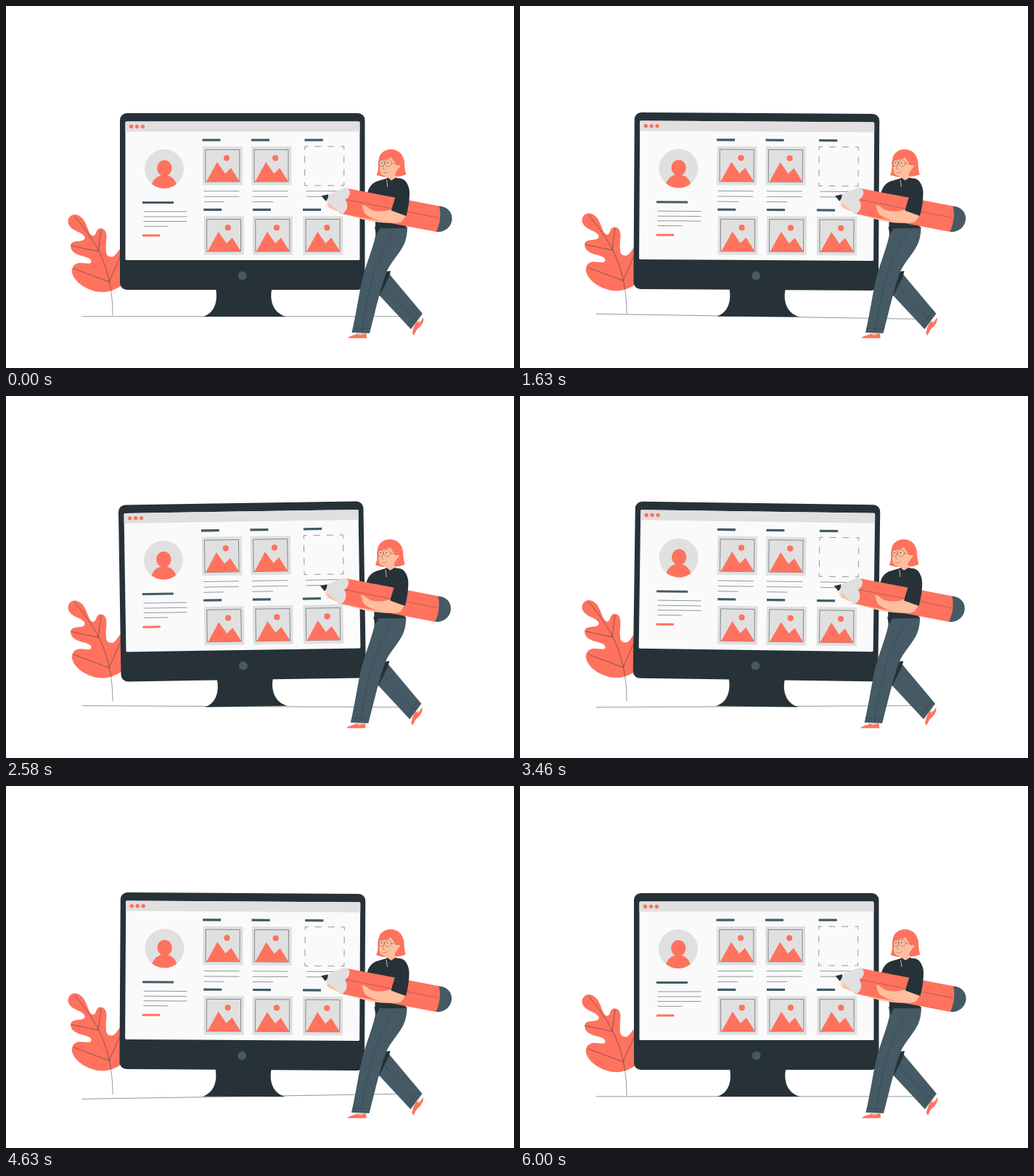
Animation of 700x500 px, one loop 6040 ms. Source, as an HTML page:

```html
<!DOCTYPE html>
<html lang="en">
<head>
<meta charset="utf-8">
<title>Designer at work</title>
<style>
  html, body { margin: 0; width: 100%; height: 100%; overflow: hidden; background: #fff; }
  svg { display: block; width: 700px; height: 500px; }
  .red { fill: #ff725e; }
  .dark { fill: #263238; }
  .slate { fill: #455a64; }
  .grey { fill: #e0e0e0; }
  .skin { fill: #ffbe9d; }
  .line { fill: none; stroke: #263238; stroke-width: .5; stroke-linecap: round; stroke-linejoin: round; }
  .soft { stroke-opacity: .65; }
</style>
</head>
<body>
<svg viewBox="0 0 700 500">
  <defs>
    <clipPath id="round"><circle cx="218" cy="225" r="27"/></clipPath>
    <g id="card">
      <rect class="grey" width="55" height="53.5"/>
      <rect class="line" x="4.2" y="4.4" width="46.6" height="44.4"/>
      <path class="red" d="M5 48.8 20 21.5 31 37.5 39 29.7 51 48.8Z"/>
      <circle class="red" cx="33" cy="16" r="4.1"/>
    </g>
  </defs>

  <path id="floor" class="line" d="M105 428.8H545"/>

  <g id="plant">
    <path class="red" d="M95 288C88 288 84 295 86 301C90 311 103 311 108 318C110 322 107 324 102 324.5C96 325 90 325 89 331C89 339 96 343 104 345C112 347 118 349 117.5 353.5C116 358 108 354 100 355C93 356 89 363 91.5 370C95 382 113 394 130 395C142 396 153 391 162 384L166 328C157 332 154 342 148 346C142 348 138 344 138 339C137 331 138.5 324 138.5 317C138 309 133 306 128 307.5C123 310 125 317 120 317.5C114 317 113 304 106 294C102 290 99 288 95 288Z"/>
    <path class="line" d="M95 291C115 315 128 335 136 358C143 378 147 400 147 427M90 331 127 339 131 309M94 363 142 381 158 345"/>
  </g>

  <g id="monitor">
    <path class="dark" d="M289 390C292 406 289 423 272 429H386C367 424 363 405 366.5 390Z"/>
    <rect class="dark" x="157" y="148" width="337.5" height="244" rx="9.5"/>
    <rect x="164.5" y="159.5" width="323" height="191.5" rx="1.5" fill="#fafafa"/>
    <path class="grey" d="M164.5 173.5V161Q164.5 159.5 166 159.5H486Q487.5 159.5 487.5 161V173.5Z"/>
    <circle class="slate" cx="325.7" cy="372.5" r="6"/>
    <g class="red">
      <circle cx="172.6" cy="166.5" r="2.7"/>
      <circle cx="180.5" cy="166.5" r="2.7"/>
      <circle cx="188.4" cy="166.5" r="2.7"/>
    </g>
    <circle class="grey" cx="218" cy="225" r="27"/>
    <g class="red" clip-path="url(#round)">
      <ellipse cx="218.3" cy="224" rx="10.2" ry="11"/>
      <path d="M200 249C203 238 210 233.5 218 233.5S233 238 236 249V256H200Z"/>
    </g>
    <rect class="red" x="188" y="315.5" width="24.3" height="3"/>
    <path class="slate" d="M188 270h43v3h-43zM270.5 183.5h25v3.3h-25zM338 183.5h25v3.3h-25zM411.5 183.5h25.3v3.3h-25.3zM272.3 279.8h25v3.2h-25zM340 279.8h25v3.2h-25zM409 279.8h25v3.2h-25z"/>
    <path class="line" d="M190 284H249M190 291H249M190 297.5H249M190 304.3H223M273 255.7H321M273 263.2H321M273 270.4H300M340 255.7H388M340 263.2H388M340 270.4H368M414 255.7H462M414 263.2H462"/>
    <use href="#card" x="271" y="194"/>
    <use href="#card" x="338.2" y="194"/>
    <use href="#card" x="272.8" y="290.2"/>
    <use href="#card" x="340" y="290.2"/>
    <use href="#card" x="409.3" y="290.2"/>
    <rect class="line" style="stroke-linecap:butt" x="411.7" y="194" width="54" height="54" stroke-dasharray="9 9" stroke-dashoffset="4.5"/>
  </g>

  <g id="woman">
    <path class="slate" d="M528 370 574 425 558 446.5 513 398 512 372Z"/>
    <path class="dark" d="M511 368 530 366 528 374 515 400 511 402Z"/>
    <path class="line soft" d="M521 385 566 436M554 442 570 420"/>
    <path class="skin" d="M564 440 569 434 573 437 567 443Z"/>
    <path class="red" d="M575 430C577 436 571 443 566 447L562 455 560 452C561 444 563 441 566 436L570 438Z"/>
    <path class="slate" d="M510 305H553C553 315 551 325 547 332C541 343 530 355 525 366C518 382 508 425 501 452L476.5 451C482 428 486 400 490 382C494 362 505 337 509 318Z"/>
    <path class="dark" d="M508 305 516 306 510 316Z"/>
    <path class="line soft" d="M534 310C525 330 512 350 506 372C500 396 493 428 490 450M478 445 502 446"/>
    <path class="skin" d="M482 452H497V456H484Z"/>
    <path class="red" d="M471 458.7C472 456 479 455 484 453L488 455 496 452.5 497.3 458.7Z"/>

    <path class="dark" d="M525 238 513 241.5C504 244 500 251 498 258L509 268V307H551L555 262C556 248 552 238 541 238Z"/>

    <path class="red" d="M513.5 214C514 203 522 198 530 198C542 198 548 206 549 216C549 223 550 228 551.3 232.5C546 235 541 236 535 235L520 236 510.5 233.5C513.5 228 513 220 513.5 214Z"/>
    <path class="skin" d="M515.5 213C520 213 527 212 531 209C533 213 536 216 539 220C544 216 545 222 541 224C539 228 537 229 536.5 232V239L531 241 525.5 239V235.5C518 235 514.5 231 515 225Z"/>
    <g class="line soft">
      <circle cx="517.5" cy="217" r="4.3"/>
      <circle cx="526.8" cy="217" r="4.7"/>
      <path d="M531.5 217 543 219.5M520.5 220 519.5 225 522 225.2M519.5 230.5Q523 231.5 526 229"/>
    </g>
    <circle class="dark" cx="518" cy="216.5" r=".8"/>
    <circle class="dark" cx="526" cy="216.5" r=".8"/>
    <path d="M550 224 556 228" fill="none" stroke="#ff725e" stroke-opacity=".4" stroke-width=".5"/>
    <path class="dark" d="M524 239 526 237 531 241 538 236.5 541 240 531 246 526 251Z"/>
    <path d="M524.5 240 526 250" fill="none" stroke="#ffd9c7" stroke-width=".8"/>

    <path class="skin" d="M440 271 451 273 500 287H546V298.5C526 302 502 298 485 293C470 289 457 284 450 280.5L443 278 446 277 440.5 275 445 274Z"/>
    <path class="red" d="M468 251.5 598 276.6C601 288 599 302 593.5 312L460 286.5Z"/>
    <path class="slate" d="M597 276.5C609 277 616 286 614.5 296C613 306 604 313 593 311.8C598 301 600 288 597 276.5Z"/>
    <path class="grey" d="M443 260.5 465 251.7C471 250 475 255 473.5 259.5C473 264 470 266 467.5 267.5C472 274 471 283 463 287.5L440.5 269Z"/>
    <path class="dark" d="M434.7 262.3 444 260.2C444.5 264 443 267 440.5 269.5Z"/>
    <path class="line soft" d="M469 267.5 596 292.5"/>
    <path class="skin" d="M533 280C522 285 509 284.5 502 281C498 278 494 274 490.5 275.5C493 279 492 284 496 288C505 296 533 303 545 298L552 288Z"/>
    <path class="dark" d="M544 240C552 242 556 249 556 258C556 270 554 281 551.5 290L531 282.5C533 274 536 266 538 260Z"/>
  </g>
</svg>
<script>
  const LOOP = 6040, FPS = 24;
  const part = id => document.getElementById(id);
  const floor = part('floor'), plant = part('plant'), monitor = part('monitor'), woman = part('woman');
  const phase = (t, period) => (t % period) / period;

  // 0 → 1 at a quarter → -1 at three quarters → 0
  const sway = p => p < .25 ? 4 * p : p < .75 ? 2 - 4 * p : 4 * p - 4;
  // 0 → 1 at half → 0
  const bob = p => 1 - Math.abs(1 - 2 * p);

  const turn = (el, deg, x, y) => el.setAttribute('transform', `rotate(${deg} ${x} ${y})`);
  const shift = (el, x, y) => el.setAttribute('transform', `translate(${x} ${y})`);

  function draw(now) {
    const step = Math.floor((now % LOOP) * FPS / 1000 + .1);
    const t = step / FPS;
    const fast = phase(t, 1.5);
    turn(floor, sway(phase(t, 6)), 325, 428.8);
    turn(monitor, sway(fast), 325.7, 288.5);
    shift(plant, 0, -10 * bob(fast));
    shift(woman, -3 * bob(fast), 0);
    requestAnimationFrame(draw);
  }
  draw(0);
</script>
</body>
</html>
```
